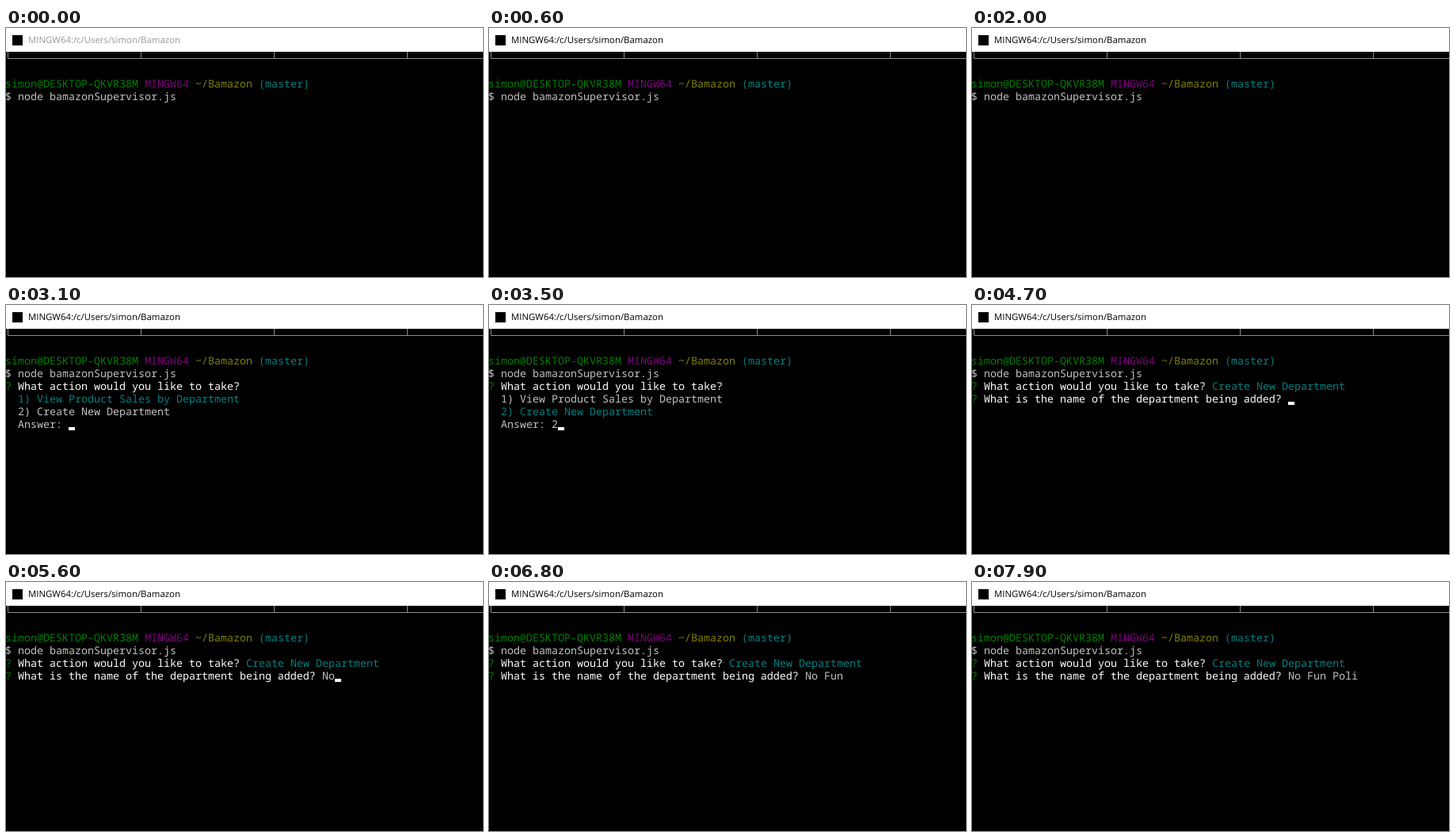
An HTML page for the animation above (8000 ms loop, 602 by 314 pixels).

```html
<!DOCTYPE html>
<html lang="en">
<head>
<meta charset="utf-8">
<title>Terminal</title>
<style>
  html, body { margin: 0; width: 100%; height: 100%; overflow: hidden; background: #000; }
  svg { display: block; width: 602px; height: 314px; }
  text { white-space: pre; text-rendering: geometricPrecision; }
  #term { font: 13.333px "Noto Sans Mono", "DejaVu Sans Mono", monospace; }
  #title { font: 11.4px "Open Sans", "Noto Sans", sans-serif; }
</style>
</head>
<body>
<svg viewBox="0 0 602 314">
  <rect width="602" height="314" fill="#000"/>
  <rect width="602" height="30" fill="#fff"/>
  <rect x="8" y="9" width="13" height="13" fill="#000"/>
  <text id="title" x="28" y="19">MINGW64:/c/Users/simon/Bamazon</text>
  <path d="M2.5 30V38.5H602M170.5 30V38.5M338.5 30V38.5M506.5 30V38.5" fill="none" stroke="#8c8c8c"/>
  <g id="term"></g>
  <rect id="cursor" width="8" height="4" fill="#fff"/>
</svg>
<script>
const LOOP = 8000, CELL = 8, ROW = 16, LEFT = -1, TOP = 62;
const GREEN = '#008000', PURPLE = '#800080', OLIVE = '#808000',
      TEAL = '#008080', GREY = '#c0c0c0', WHITE = '#fff';

const title = document.getElementById('title');
const term = document.getElementById('term');
const cursor = document.getElementById('cursor');

// A line is a list of [text, colour] runs.
const shell = [
  [['simon@DESKTOP-QKVR38M', GREEN], [' MINGW64', PURPLE], [' ~/Bamazon', OLIVE], [' (master)', TEAL]],
  [['$ node bamazonSupervisor.js', GREY]]
];
const ask = (question, answer = '', color = TEAL) =>
  [['?', GREEN], [` ${question} `, WHITE], [answer, color]];
const action = answer => ask('What action would you like to take?', answer);

const menu = pick => [
  ...shell,
  action(),
  [['  1) View Product Sales by Department', pick === '2' ? GREY : TEAL]],
  [['  2) Create New Department', pick === '2' ? TEAL : GREY]],
  [['  Answer: ' + pick, GREY]]
];
const chosen = [...shell, action('Create New Department')];
const naming = name => [
  ...chosen,
  ask('What is the name of the department being added?', name, GREY)
];

// [start ms, lines, cursor column, cursor row]; no column means a hidden cursor.
const steps = [
  [0, shell],
  [1000, shell, 27, 1],
  [1500, shell],
  [1800, shell, 0, 2],
  [2000, shell],
  [2400, menu(''), 10, 5],
  [2500, menu('')],
  [3100, menu(''), 10, 5],
  [3500, menu('2'), 11, 5],
  [3600, chosen, 0, 3]
];

// [start ms, letters typed, cursor shown]
const typing = [
  [3700, 0, 1], [4100, 0, 0], [4700, 0, 1], [5200, 0, 0],
  [5300, 1, 1], [5600, 2, 1], [5700, 2, 0], [6000, 4, 1],
  [6100, 5, 1], [6300, 6, 1], [6600, 7, 1], [6800, 7, 0],
  [7000, 8, 1], [7300, 9, 1], [7600, 10, 1], [7800, 11, 1], [7900, 11, 0]
];
for (const [at, count, shown] of typing) {
  steps.push([at, naming('No Fun Poli'.slice(0, count)), shown ? 50 + count : undefined, 3]);
}

function drawLine(runs, row) {
  let col = 0;
  for (const [str, color] of runs) {
    const lead = str.length - str.trimStart().length;
    const el = document.createElementNS('http://www.w3.org/2000/svg', 'text');
    el.setAttribute('x', LEFT + (col + lead) * CELL);
    el.setAttribute('y', TOP + row * ROW + 13);
    el.setAttribute('fill', color);
    el.textContent = str.trim();
    term.append(el);
    col += str.length;
  }
}

function show([, lines, col, row]) {
  term.replaceChildren();
  lines.forEach(drawLine);
  const on = col !== undefined;
  cursor.setAttribute('visibility', on ? 'visible' : 'hidden');
  if (on) {
    cursor.setAttribute('x', LEFT + col * CELL);
    cursor.setAttribute('y', TOP + row * ROW + 12);
  }
}

// The title darkens in five even steps as the window gains focus.
function titleColor(t) {
  const k = Math.min(5, Math.max(0, Math.floor(t / 100) - 1));
  const v = Math.round(153 * (1 - k / 5));
  return `rgb(${v},${v},${v})`;
}

const start = performance.now();
let current;
function tick() {
  const t = (performance.now() - start) % LOOP;
  const step = steps.findLast(s => s[0] <= t);
  if (step !== current) show(current = step);
  title.setAttribute('fill', titleColor(t));
  requestAnimationFrame(tick);
}
tick();
</script>
</body>
</html>
```
